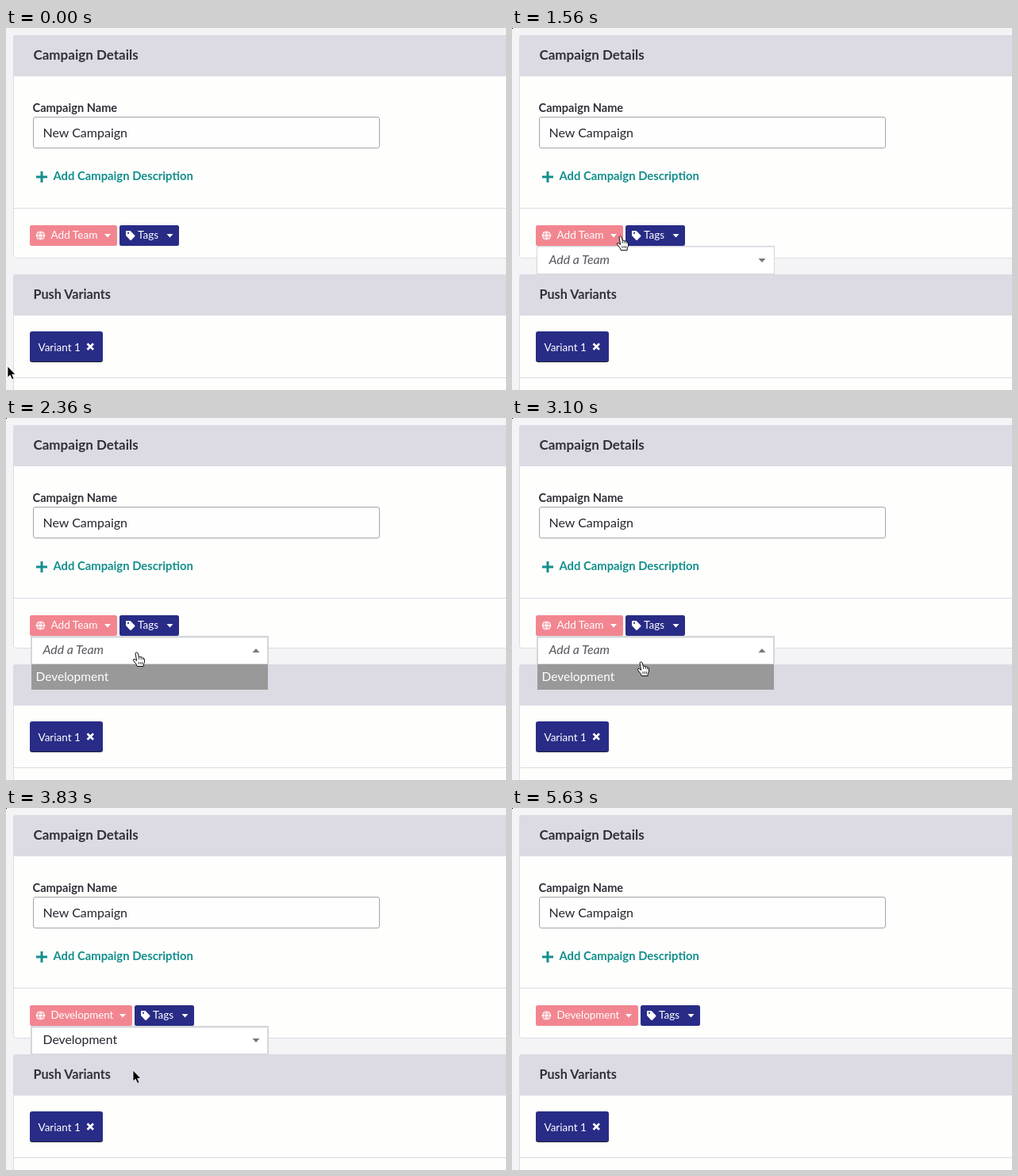
Recreate the animation shown at these times as an HTML page. Size 630x457 px, loop 5700 ms.

```html
<!DOCTYPE html>
<html lang="en">
<head>
<meta charset="utf-8">
<title>Campaign team picker</title>
<style>
  html, body { margin: 0; width: 100%; height: 100%; overflow: hidden; background: #f4f4f6; }
  svg { display: block; width: 630px; height: 457px; }
  text { font: 13.5px Lato, "Open Sans", sans-serif; fill: #fff; white-space: pre; }
  .bold { font-weight: 700; fill: #303038; }
  .field { font-size: 15.8px; fill: #25252f; }
  .hint { font-style: italic; fill: #55555c; }
  .panel { fill: #fefefd; stroke: #dcdbe2; }
  .head { fill: #dcdae2; }
  .rule { stroke: #dcdbe2; }
  .pink { fill: #f28690; }
  .navy { fill: #282c86; }
  .white { fill: #fff; }
  .grey { fill: #77777b; }
</style>
</head>
<body>
<svg viewBox="0 0 630 457">
  <rect width="630" height="457" fill="#f4f4f6"/>

  <rect class="panel" x="9.5" y="9.5" width="640" height="281" rx="3"/>
  <path class="head" d="M9 61V12q0-3 3-3h618v52z"/>
  <path class="rule" d="M10 227.5h620"/>
  <text class="bold" x="34.5" y="40" style="font-size:17px">Campaign Details</text>
  <text class="bold" x="33.5" y="106" style="font-size:14.6px">Campaign Name</text>
  <rect x="34.5" y="112.5" width="436" height="39" rx="2.5" fill="#fefefe" stroke="#a6a6ab"/>
  <text class="field" x="46.5" y="138.3" style="font-size:16px">New Campaign</text>
  <path d="M38 188h14M45 181v14" stroke="#128f8c" stroke-width="3"/>
  <text class="bold" x="59.5" y="192.3" style="font-size:14.8px;fill:#128f8c">Add Campaign Description</text>

  <rect class="panel" x="9.5" y="311.5" width="640" height="180" rx="3"/>
  <path class="head" d="M9 363v-49q0-3 3-3h618v52z"/>
  <path class="rule" d="M10 441.5h620"/>
  <text class="bold" x="34.5" y="342" style="font-size:16.2px">Push Variants</text>
  <rect x="30" y="384" width="92" height="38" rx="3" fill="#26262f"/>
  <rect class="navy" x="30" y="383" width="92" height="38" rx="3"/>
  <text x="40.5" y="408">Variant 1</text>
  <path d="M102.5 398.5l7.5 7.5m0-7.5l-7.5 7.5" stroke="#fff" stroke-width="2.6"/>

  <rect class="pink" id="team" x="30" y="249" width="110" height="26" rx="2.5"/>
  <circle class="white" cx="43.5" cy="262" r="5.8"/>
  <g fill="none" stroke="#f28690" stroke-width=".9">
    <ellipse cx="43.5" cy="262" rx="2.7" ry="5.9"/>
    <path d="M37.5 260h12M37.5 264h12"/>
  </g>
  <text id="teamName" x="56.5" y="266.3"></text>
  <g id="right">
    <path class="white" d="M124 260h8l-4 4.5z"/>
    <rect class="navy" x="143" y="249" width="75" height="26" rx="2.5"/>
    <path class="white" fill-rule="evenodd" d="M151 257q0-1 1-1h4.6l5.6 5.8q.6.8 0 1.5l-4.4 4.4q-.7.6-1.4 0l-5.4-5.6zm3 .7a1.1 1.1 0 1 0 .1 0z"/>
    <text x="166" y="266.3">Tags</text>
    <path class="white" d="M202.500 260h8l-4 4.500z"/>
  </g>

  <g id="select">
    <path d="M31 275h300v36H31z" fill="#d6d6da"/>
    <path class="white" id="inner"/>
    <text id="value" x="46.500" y="298.300"></text>
    <path class="grey" id="caret"/>
  </g>
  <g id="list">
    <path d="M32 311h298v32H32z" fill="#999"/>
    <path class="head" d="M10 343h620v20H10z"/>
    <path class="head" d="M10 311h22v32H10zM330 311h300v32H330z"/>
    <text x="37.500" y="332.300" style="font-size:15.500px">Development</text>
  </g>

  <path id="dot" d="M0 0h1v1H0z"/>
  <path id="arrow" d="M0 0V14.200L3.200 11.300L5.600 16.600L8 15.600L5.700 10.400H9.900Z" stroke="#fff" stroke-width=".8"/>
  <g id="hand" fill="#fff" stroke="#111" stroke-linejoin="round">
    <path d="M-2 1Q-.5-1.500 1.200 1L2.300 5.500Q4 4.500 5 6Q6.800 5.500 7.600 7Q9.300 6.800 9.500 9V12L8.200 15V17.500H.2L-.8 15L-4.700 9.800Q-4.600 7.500-2.600 8.600L-.4 10.400Z"/>
    <path d="M2.300 5.500L2.800 9M5 6l.4 3M7.600 7l.2 2.500M2 12v3M4.300 12v3M6.500 12v3" stroke-width=".8"/>
  </g>
</svg>
<script>
const LOOP = 5700, STEP = 200 / 3;
const OPEN = 1030, LIST = 2360, PICK = 3690, CLOSE = 4500;

// Pointer tip: time, x, y
const path = [
  [30, 2, 427], [560, 138, 268], [760, 137, 262], [1500, 137, 262], [1560, 137, 263],
  [2030, 166, 295], [2160, 165, 296], [2840, 165, 296], [3430, 161, 325],
  [3500, 161, 326], [3830, 160, 331], [5370, 160, 331], [5570, 159, 382]
];

const $ = id => document.getElementById(id);
const show = (id, on) => $(id).style.display = on ? "" : "none";
const ease = p => p * p * (3 - 2 * p);

function pointer(t) {
  const i = path.findIndex(k => k[0] >= t);
  if (i < 0) return path[path.length - 1].slice(1);
  if (i === 0) return path[0].slice(1);
  const [t0, x0, y0] = path[i - 1], [t1, x1, y1] = path[i];
  const p = ease((t - t0) / (t1 - t0));
  return [x0 + (x1 - x0) * p, y0 + (y1 - y0) * p];
}

function draw(now) {
  const ms = now % LOOP;
  // The screen refreshes fifteen times a second
  const t = ms < 25 ? 0 : 30 + Math.floor((ms - 25) / STEP) * STEP;
  const picked = t >= PICK, focus = t >= LIST - 5, listed = focus && !picked;

  $("team").setAttribute("width", picked ? 129 : 110);
  $("teamName").textContent = picked ? "Development" : "Add Team";
  $("teamName").style.fontSize = picked ? "13.3px" : "13.6px";
  $("right").setAttribute("transform", `translate(${picked ? 19 : 0})`);

  show("select", t >= OPEN - 5 && t < CLOSE - 5);
  $("inner").setAttribute("d", focus ? "M33 277.500h296v32.500H33z" : "M32 276.500h298v33.500H32z");
  $("value").textContent = picked ? "Development" : "Add a Team";
  $("value").setAttribute("class", picked ? "field" : "field hint");
  $("caret").setAttribute("d", listed ? "M310.500 296h9l-4.500-5z" : "M310.500 291h9l-4.500 5z");
  show("list", listed);

  const [x, y] = pointer(t).map(Math.round);
  const over = t > 470 && !picked;
  show("dot", t > 0);
  show("hand", over);
  show("arrow", !over && t < 5620);
  for (const id of ["hand", "arrow"]) $(id).setAttribute("transform", `translate(${x} ${y})`);
}

function tick() {
  draw(performance.now());
  requestAnimationFrame(tick);
}
tick();
</script>
</body>
</html>
```
